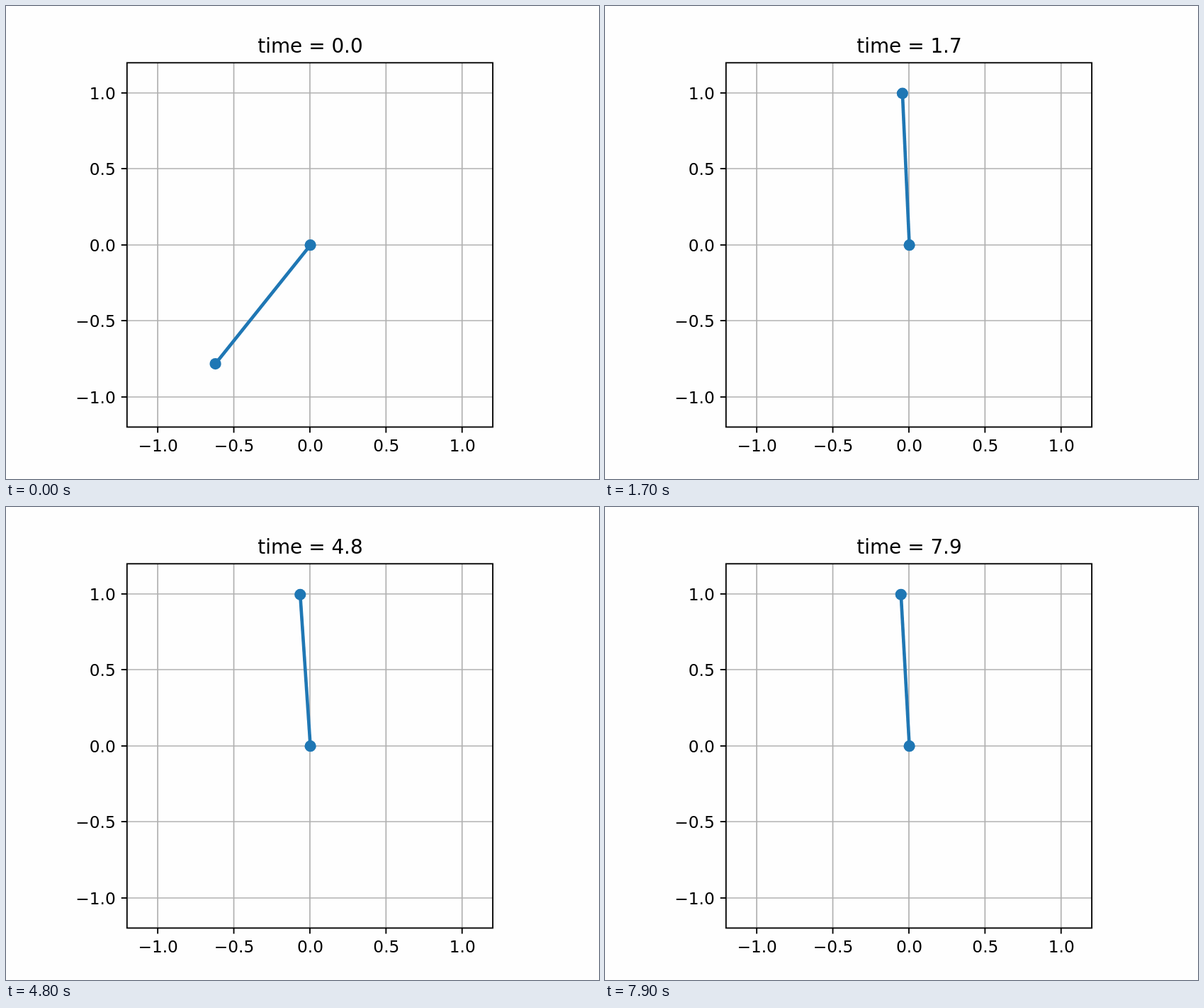
An HTML page for the animation above (8000 ms loop, 837x669 px).

```html
<!DOCTYPE html>
<html lang="en">
<head>
<meta charset="utf-8">
<title>Pendulum</title>
<style>
  html, body { margin: 0; width: 100%; height: 100%; overflow: hidden; background: #fefefe; }
  svg { display: block; width: 837px; height: 669px; }
  text { font: 23.25px "DejaVu Sans", sans-serif; fill: #000; text-anchor: middle; }
  .side { text-anchor: end; }
  #title { font-size: 27.9px; }
  .grid { stroke: #b0b0b0; stroke-width: 1.7; }
  .axis { stroke: #000; stroke-width: 1.86; fill: none; }
  #rod { stroke: #1f77b4; stroke-width: 4.65; }
  circle { fill: #1f77b4; }
</style>
</head>
<body>
<svg viewBox="0 0 837 669">
  <g id="plot"></g>
  <rect class="axis" x="170.8" y="80.3" width="516.3" height="515.2"/>
  <text id="title" x="429.5" y="66"></text>
  <line id="rod"/>
  <circle id="pivot" r="8.1"/>
  <circle id="bob" r="8.1"/>
</svg>
<script>
const LOOP = 8000, STEP = 100;
const CX = 428.95, CY = 337.9, UNIT = 214.8;
const LEFT = 170.8, RIGHT = 687.1, TOP = 80.3, BOTTOM = 595.5, TICK = 8.1;
const PIVOT_X = 429.6, PIVOT_Y = 338.2;
const START_ANGLE = -38.6;

const byId = id => document.getElementById(id);
const plot = byId("plot");

function place(node, attrs) {
  for (const name in attrs) node.setAttribute(name, attrs[name]);
}

function add(tag, attrs, label = "") {
  const node = document.createElementNS("http://www.w3.org/2000/svg", tag);
  place(node, attrs);
  node.textContent = label;
  plot.append(node);
}

function addLine(kind, x1, y1, x2, y2) {
  add("line", { class: kind, x1, y1, x2, y2 });
}

for (let i = -2; i <= 2; i++) {
  const x = CX + i * UNIT / 2, y = Math.round(CY - i * UNIT / 2);
  const label = (i < 0 ? "\u2212" : "") + Math.abs(i / 2).toFixed(1);
  addLine("grid", x, TOP, x, BOTTOM);
  addLine("grid", LEFT, y, RIGHT, y);
  addLine("axis", x, BOTTOM, x, BOTTOM + TICK);
  addLine("axis", LEFT - TICK, y, LEFT, y);
  add("text", { x: x + 0.5, y: 629.7 }, label);
  add("text", { x: 154.8, y: y + 8.6, class: "side" }, label);
}

const wave = (t, peak, period) => Math.cos(2 * Math.PI * (t - peak) / period);

// Degrees from hanging straight down: a swing up, then a slow sway near the top.
function angleAt(t) {
  const upright = 183 + 0.65 * wave(t, 4.3, 3.4) + 0.45 * wave(t, 5, 5.5);
  const progress = 1 - Math.exp(-Math.pow(t / 0.585, 1.92));
  return START_ANGLE + (upright - START_ANGLE) * progress;
}

const rod = byId("rod"), bob = byId("bob"), title = byId("title");
place(byId("pivot"), { cx: PIVOT_X, cy: PIVOT_Y });

function draw(ms) {
  const t = Math.floor((ms % LOOP) / STEP) / 10;
  const angle = angleAt(t) * Math.PI / 180;
  const x = PIVOT_X + UNIT * Math.sin(angle), y = PIVOT_Y + UNIT * Math.cos(angle);
  place(rod, { x1: PIVOT_X, y1: PIVOT_Y, x2: x, y2: y });
  place(bob, { cx: x, cy: y });
  title.textContent = "time = " + t.toFixed(1);
}

const start = performance.now();
function tick() {
  draw(performance.now() - start);
  requestAnimationFrame(tick);
}
tick();
</script>
</body>
</html>
```
